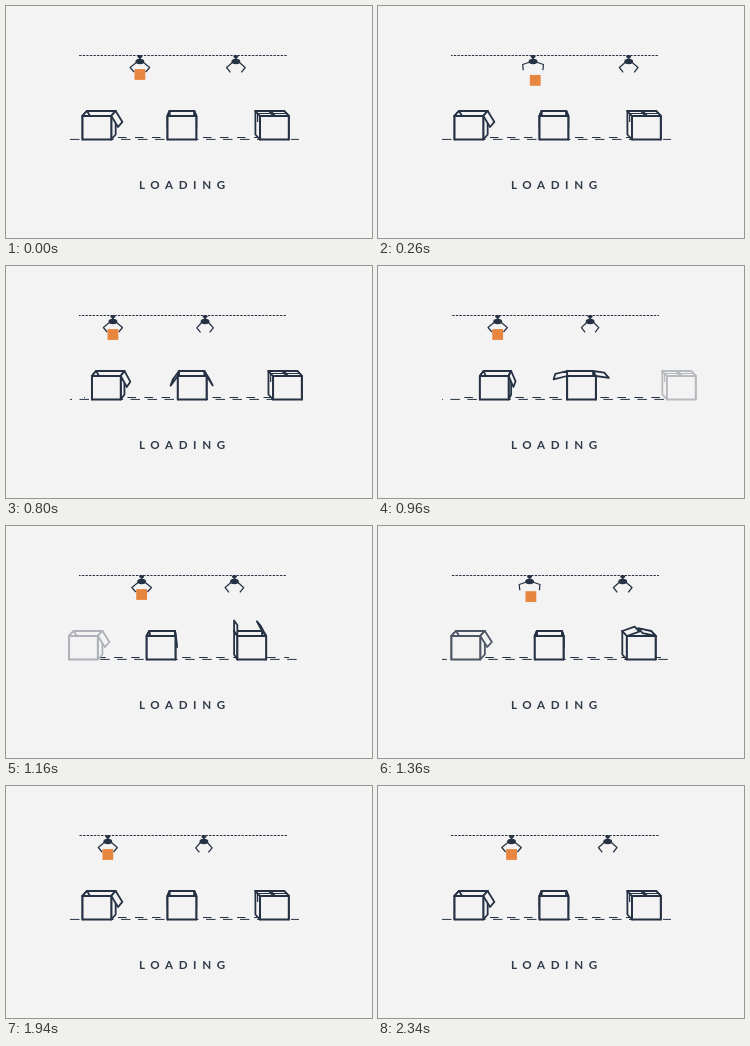
Recreate the animation shown at these times as an HTML page with a canvas. Size 366x232 px, loop 2.36 s.

```html
<!DOCTYPE html>
<html lang="en">
<head>
<meta charset="utf-8">
<title>Loading</title>
<style>
  html, body { margin: 0; width: 100%; height: 100%; overflow: hidden; background: #f3f3f3; }
  canvas { position: absolute; left: 0; top: 0; }
  p {
    position: absolute; left: 133px; top: 171px; margin: 0; white-space: nowrap;
    font: 700 11.6px/16px Lato, sans-serif; letter-spacing: 5.6px; color: #2f3a4b;
  }
</style>
</head>
<body>
<canvas id="stage" width="366" height="232"></canvas>
<p>LOADING</p>
<script>
const ctx = document.getElementById('stage').getContext('2d');
const INK = [38, 50, 68], PAPER = [243, 243, 243], ORANGE = '#e8853f';
const LOOP = 2360, LAST = 2340;
const SPEED = 0.08, DROP_X = 146.4;
const RIM = 110, BACK = 105, FLOOR = 133.5, WIDTH = 28.8;

// Claws: x at time zero and speed in px/ms
const CLAWS = [[229.8, 0.08], [133.8, 0.0815], [43, 0.0798], [-52.5, 0.0795]];

// Arm pose by claw position: x, elbow x, elbow y, tip x, tip y
const ARM_POSES = [
  [75, 9.3, 61.5, 5.8, 66], [138, 9.8, 61.5, 5.8, 66], [151, 10.4, 58.5, 9.8, 64.3],
  [157, 10.4, 58.5, 9.8, 64.3], [180, 7.6, 62, 4, 66.3], [230, 9.3, 61.5, 5.5, 66.3],
  [300, 9.3, 61.5, 5.5, 66.3]
];

const clamp = (v, lo = 0, hi = 1) => Math.min(hi, Math.max(lo, v));
const lerp = (a, b, p) => a + (b - a) * p;
const bezier = (s, a, b) => 3 * (1 - s) ** 2 * s * a + 3 * (1 - s) * s * s * b + s ** 3;
const ink = strength => `rgb(${PAPER.map((c, i) => Math.round(lerp(c, INK[i], strength)))})`;
const clawAlpha = x => clamp((x - 76) / 21) * clamp((275 - x) / 18);

// Progress of the conveyor step
function beltStep(t) {
  const p = clamp((t - 495) / 1155);
  let lo = 0, hi = 1;
  for (let i = 0; i < 20; i++) {
    const mid = (lo + hi) / 2;
    if (bezier(mid, 0.68, 0.3) < p) lo = mid; else hi = mid;
  }
  return p === 0 || p === 1 ? p : bezier(lo, 0.1, 1);
}

function path(points, closed, width = 2) {
  ctx.beginPath();
  points.forEach(([x, y]) => ctx.lineTo(x, y));
  if (closed) {
    ctx.closePath();
    ctx.fill();
  }
  ctx.lineWidth = width;
  ctx.stroke();
}

function dashes(y, from, to, dash, gap, shift, width) {
  ctx.setLineDash([dash, gap]);
  ctx.lineDashOffset = -shift;
  path([[from, y], [to, y]], false, width);
  ctx.setLineDash([]);
}

function ellipse(x, y, rx, ry) {
  ctx.beginPath();
  ctx.ellipse(x, y, rx, ry, 0, 0, 7);
  ctx.fill();
}

function drawClaw(x) {
  ctx.globalAlpha = clawAlpha(x);
  const i = clamp(ARM_POSES.findIndex(pose => pose[0] > x), 1, ARM_POSES.length - 1);
  const from = ARM_POSES[i - 1], to = ARM_POSES[i];
  const p = (x - from[0]) / (to[0] - from[0]);
  const [, ex, ey, tx, ty] = from.map((v, j) => lerp(v, to[j], p));
  ctx.strokeStyle = ctx.fillStyle = ink(1);
  for (const side of [-1, 1]) {
    path([[x + side * 3, 56], [x + side * ex, ey], [x + side * tx, ty]], false, 1.25);
  }
  ellipse(x, 50.5, 2.6, 1.6);
  ctx.fillRect(x - 1, 51, 2, 3);
  ellipse(x, 55.5, 4.4, 2.7);
  ctx.globalAlpha = 1;
}

function drawCube(clawX) {
  const fall = Math.max(0, clawX - DROP_X) / SPEED;
  const x = fall ? DROP_X + 0.1 * fall : clawX;
  const y = 68.5 + 0.0005 * fall * fall;
  if (y > 122) return;
  ctx.globalAlpha = clawAlpha(clawX);
  ctx.fillStyle = ORANGE;
  ctx.fillRect(x - 5.4, y - 5.4, 10.8, 10.8);
  ctx.globalAlpha = 1;
}

function drawFlap(side, frontX, backX, angle, view) {
  const sin = Math.sin(angle);
  const dx = side * 13.5 * Math.cos(angle) + 7 * view * Math.max(0, -sin);
  const dy = -11 * sin;
  const shrink = 1 - 0.2 * (1 - Math.abs(view));
  path([[frontX, RIM], [backX, BACK], [backX + dx * shrink, BACK + dy * shrink],
    [frontX + dx, RIM + dy]], true, 1.8);
}

function drawBoxBack({ x, left, right, tape, strength }) {
  const view = clamp((161.5 - x) / 88, -1, 1);
  const inset = 2 * (1 - Math.abs(view));
  const r = x + WIDTH;
  const bl = x + 4.6 * view + inset, br = r + 4.6 * view - inset;
  ctx.strokeStyle = ink(strength);
  ctx.fillStyle = ink(0);
  path([[x, RIM], [bl, BACK], [br, BACK], [r, RIM]], true);
  path([[x, RIM], [bl, BACK], [bl, 128.5], [x, FLOOR]], true, 1.8);
  path([[r, RIM], [br, BACK], [br, 128.5], [r, FLOOR]], true, 1.8);
  drawFlap(1, r, br, right, view);
  drawFlap(-1, x, bl, left, view);
  if (tape) {
    ctx.setLineDash([tape * 38, 99]);
    ctx.lineDashOffset = 0;
    path([[x + 26.4, 107.5], [x - 2.4, 107.5], [x - 2.4, 116]], false, 1.2);
    ctx.setLineDash([]);
  }
}

function drawBoxFront({ x, strength }) {
  ctx.strokeStyle = ink(strength);
  ctx.fillStyle = ink(0);
  path([[x, RIM], [x + WIDTH, RIM], [x + WIDTH, FLOOR], [x, FLOOR]], true);
}

function draw(t) {
  const step = beltStep(t);
  const hanging = -Math.PI / 2;
  const flapAngle = p => hanging + 1.5 * Math.PI * p;
  const boxes = [
    { x: lerp(21.5, 76.5, step), left: hanging, right: hanging, strength: clamp((t - 1020) / 420) },
    { x: lerp(76.5, 161.5, step), left: hanging, right: hanging, strength: 1 },
    { x: lerp(161.5, 254, step), left: flapAngle(beltStep(t - 60 * step)), right: flapAngle(step),
      tape: clamp((t - 1640) / 280), strength: 1 },
    { x: lerp(254, 371, step), left: Math.PI, right: Math.PI, tape: 1,
      strength: clamp((1020 - t) / 200) }
  ].filter(box => box.strength > 0);
  const claws = CLAWS.map(([x, speed]) => x + speed * t).filter(x => clawAlpha(x) > 0 );

  ctx.fillStyle = ink(0);
  ctx.fillRect(0, 0, 366, 232);
  ctx.strokeStyle = ink(1);
  ctx.lineJoin = 'round';

  dashes(49.5, 73, 281, 2.4, 1.2, SPEED * t, 1);
  dashes(131.5, 78, 283, 8.5, 8.5, 85 * step, 1);
  dashes(133.4, 64, 293, 9.5, 7.5, 85 * step, 1);

  boxes.forEach(drawBoxBack);
  claws.forEach(drawCube);
  boxes.forEach(drawBoxFront);
  claws.forEach(drawClaw);
}

function frame() {
  draw(Math.min(performance.now() % LOOP, LAST));
  requestAnimationFrame(frame);
}
frame();
</script>
</body>
</html>
```
